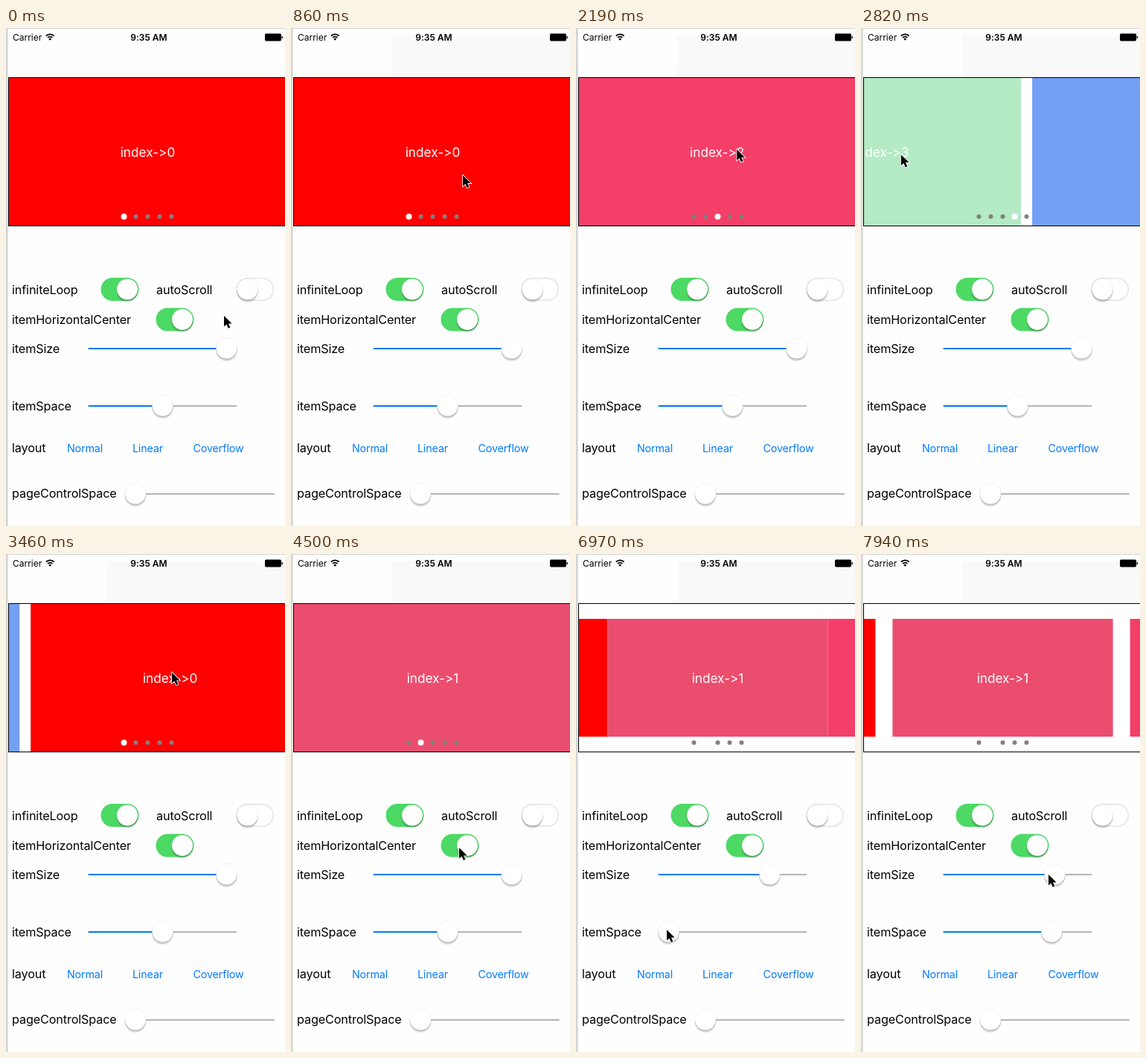
An HTML page that plays this animation: 375x668 px, repeating every 8000 ms.

```html
<!DOCTYPE html>
<html lang="en">
<head>
<meta charset="utf-8">
<title>Pager settings</title>
<style>
  html, body { margin: 0; width: 100%; height: 100%; overflow: hidden; background: #fefefe; }
  svg { display: block; width: 375px; height: 668px; }
  text {
    font: 16.2px Inter, Roboto, sans-serif;
    letter-spacing: -.12px;
    font-feature-settings: "calt" 0;
    white-space: pre;
  }
  .status { font-size: 12px; letter-spacing: 0; }
  .clock { font-weight: 600; }
  .button { font-size: 14.3px; fill: #007aff; text-anchor: middle; }
  .item text { font-size: 17.2px; letter-spacing: 0; fill: #fff; text-anchor: middle; }
  .on { fill: #4cd964; }
  .off { fill: #fff; stroke: #e4e4e4; stroke-width: 1.5; }
  .rail { fill: #b5b5b5; }
  .fill { fill: #007aff; }
</style>
</head>
<body>
<svg viewBox="0 0 375 668">
  <defs>
    <clipPath id="window"><rect x="4" y="67" width="371" height="198"/></clipPath>
    <g id="knob">
      <circle cy="3.4" r="14.6" fill="#000" opacity=".06"/>
      <circle cy="2.6" r="14" fill="#000" opacity=".14"/>
      <circle cy=".3" r="14.5" fill="#000" opacity=".12"/>
      <circle r="14" fill="#fff"/>
    </g>
  </defs>

  <rect width="375" height="668" fill="#fefefe"/>
  <rect id="panel" x="136" y="10" width="239" height="56" fill="#f9f9f9"/>
  <path d="M0 0H375V1H2.5V668H0Z" fill="#d4d4d4"/>

  <text class="status" x="9" y="17">Carrier</text>
  <g fill="none" stroke="#000" stroke-width="1.8">
    <path d="M53.8 10.6A7.6 7.6 0 0 1 64.6 10.6M56 12.9A4.5 4.5 0 0 1 62.4 12.9"/>
  </g>
  <path d="M59.2 16.8L57.2 14.7A2.9 2.9 0 0 1 61.2 14.7Z"/>
  <text class="status clock" x="192" y="17" text-anchor="middle">9:35 AM</text>
  <rect x="348" y="7.6" width="22" height="9.8" rx="1.6"/>
  <path d="M370.6 10.8Q372.2 11 372.2 12.5T370.6 14.2Z"/>

  <rect x="3.5" y="66.5" width="374" height="199" fill="#fff" stroke="#000"/>
  <g id="items" clip-path="url(#window)"></g>
  <g id="dots"></g>

  <text x="8" y="357">infiniteLoop</text>
  <rect class="on" x="127.5" y="335" width="51" height="31" rx="15.5"/>
  <use href="#knob" x="163" y="350.5"/>
  <text x="202" y="357">autoScroll</text>
  <rect class="off" x="309.7" y="335.7" width="49.6" height="29.6" rx="14.8"/>
  <use href="#knob" x="324.5" y="350.5"/>
  <text x="8" y="397">itemHorizontalCenter</text>
  <rect class="on" x="201.5" y="375.5" width="51" height="31" rx="15.5"/>
  <use href="#knob" x="237" y="391"/>

  <text x="8" y="435.5">itemSize</text>
  <g id="size">
    <rect class="rail" x="110.5" y="429" width="200" height="2" rx="1"/>
    <rect class="fill" x="110.5" y="429" width="187" height="2" rx="1"/>
    <use href="#knob" y="429.5"/>
  </g>
  <text x="8" y="512.5">itemSpace</text>
  <g id="space">
    <rect class="rail" x="110.5" y="506" width="200" height="2" rx="1"/>
    <rect class="fill" x="110.5" y="506" width="101" height="2" rx="1"/>
    <use href="#knob" y="506.5"/>
  </g>

  <text x="8" y="569">layout</text>
  <text class="button" x="106" y="568.5">Normal</text>
  <text class="button" x="190.5" y="568.5">Linear</text>
  <text class="button" x="285.5" y="568.5">Coverflow</text>

  <text x="8" y="630">pageControlSpace</text>
  <rect class="rail" x="160" y="624" width="201" height="2" rx="1"/>
  <use href="#knob" x="174" y="624.5"/>

  <path id="cursor" d="M0 0V14.5L3.4 11.4L5.8 16.8L8.4 15.7L6 10.4H10.6Z"
        stroke="#fff" stroke-width="1.6" paint-order="stroke"/>
</svg>

<script>
const LOOP = 8000, CENTER = 190.5, MIDDLE = 166;
const COLORS = ['#ff0000', '#eb4d6f', '#f43f68', '#b4eac4', '#739ff4'];
const SWIPES = 6, FIRST = 1200, PERIOD = 492.5, DRAG = 150, PULL = 0.42, GLIDE = 70;

// Rows are [time, value, value...]
const SIZE = [[5000, 1], [5620, 0.79]];
const SPACE = [[6180, 15], [6800, 0], [6970, 0], [7560, 23]];
const HAND = [[0, 217, 163], [DRAG, 53, 170], [190, 46, 174], [290, 223, 159], [PERIOD, 217, 163]];
const CURSOR = [
  [50, 293, 386], [800, 232, 200], [FIRST, 217, 163],
  [FIRST + SWIPES * PERIOD, 217, 163], [4500, 226, 394], [4900, 289, 431],
  [5000, 289, 432], [5620, 253, 432], [5820, 253, 432], [5930, 246, 490],
  [6120, 208, 504], [6180, 208, 504], [6800, 122, 504], [6970, 122, 504],
  [7560, 253, 504], [7770, 262, 492], [7940, 252, 430]
];

const $ = id => document.getElementById(id);
const smooth = x => x * x * (3 - 2 * x);

function add(parent, tag, attrs) {
  const el = document.createElementNS('http://www.w3.org/2000/svg', tag);
  for (const key in attrs) el.setAttribute(key, attrs[key]);
  return parent.appendChild(el);
}

function track(rows, t) {
  const next = rows.findIndex(row => row[0] > t);
  if (next === 0) return rows[0].slice(1);
  if (next < 0) return rows[rows.length - 1].slice(1);
  const a = rows[next - 1], b = rows[next];
  const k = smooth((t - a[0]) / (b[0] - a[0]));
  return a.slice(1).map((v, i) => v + (b[i + 1] - v) * k);
}

// Finger drag, then a decaying glide to the next page
function swipe(u) {
  if (u <= 0) return 0;
  if (u >= PERIOD) return 1;
  if (u < DRAG) return PULL * smooth(u / DRAG);
  return 1 - (1 - PULL) * Math.exp((DRAG - u) / GLIDE);
}

function pageAt(t) {
  let page = 0;
  for (let i = 0; i < SWIPES; i++) page += swipe(t - FIRST - i * PERIOD);
  return page;
}

function cursorAt(t) {
  const u = t - FIRST;
  return u >= 0 && u < SWIPES * PERIOD ? track(HAND, u % PERIOD) : track(CURSOR, t);
}

const items = [0, 1, 2].map(() => {
  const g = add($('items'), 'g', { class: 'item' });
  return { box: add(g, 'rect', {}), label: add(g, 'text', { y: 172.5 }) };
});
const dots = COLORS.map((_, i) => add($('dots'), 'circle', { cx: 158.5 + 16 * i, cy: 253 }));

function setSlider(id, value) {
  const x = 124.5 + 172 * value;
  $(id).querySelector('.fill').setAttribute('width', x - 110.5);
  $(id).querySelector('use').setAttribute('x', x);
}

function draw(t) {
  const page = pageAt(t), near = Math.round(page);
  const [ratio] = track(SIZE, t), [gap] = track(SPACE, t);
  const w = 375 * ratio, h = 200 * ratio;

  items.forEach(({ box, label }, i) => {
    const n = near + i - 1, index = (n + 5) % 5;
    const x = CENTER + (n - page) * (w + gap);
    box.setAttribute('x', x - w / 2);
    box.setAttribute('y', MIDDLE - h / 2);
    box.setAttribute('width', w);
    box.setAttribute('height', h);
    box.setAttribute('fill', COLORS[index]);
    label.setAttribute('x', x);
    label.textContent = 'index->' + index;
  });
  dots.forEach((dot, i) => {
    const active = i === near % 5;
    dot.setAttribute('r', active ? 4 : 3);
    dot.setAttribute('fill', active ? '#fff' : '#808080');
  });

  setSlider('size', ratio);
  setSlider('space', gap / 30);
  $('panel').setAttribute('visibility', t < 50 ? 'hidden' : 'visible');
  $('cursor').setAttribute('transform', `translate(${cursorAt(t)})`);
}

const start = performance.now();
function frame() {
  draw((performance.now() - start) % LOOP);
  requestAnimationFrame(frame);
}
frame();
</script>
</body>
</html>
```
